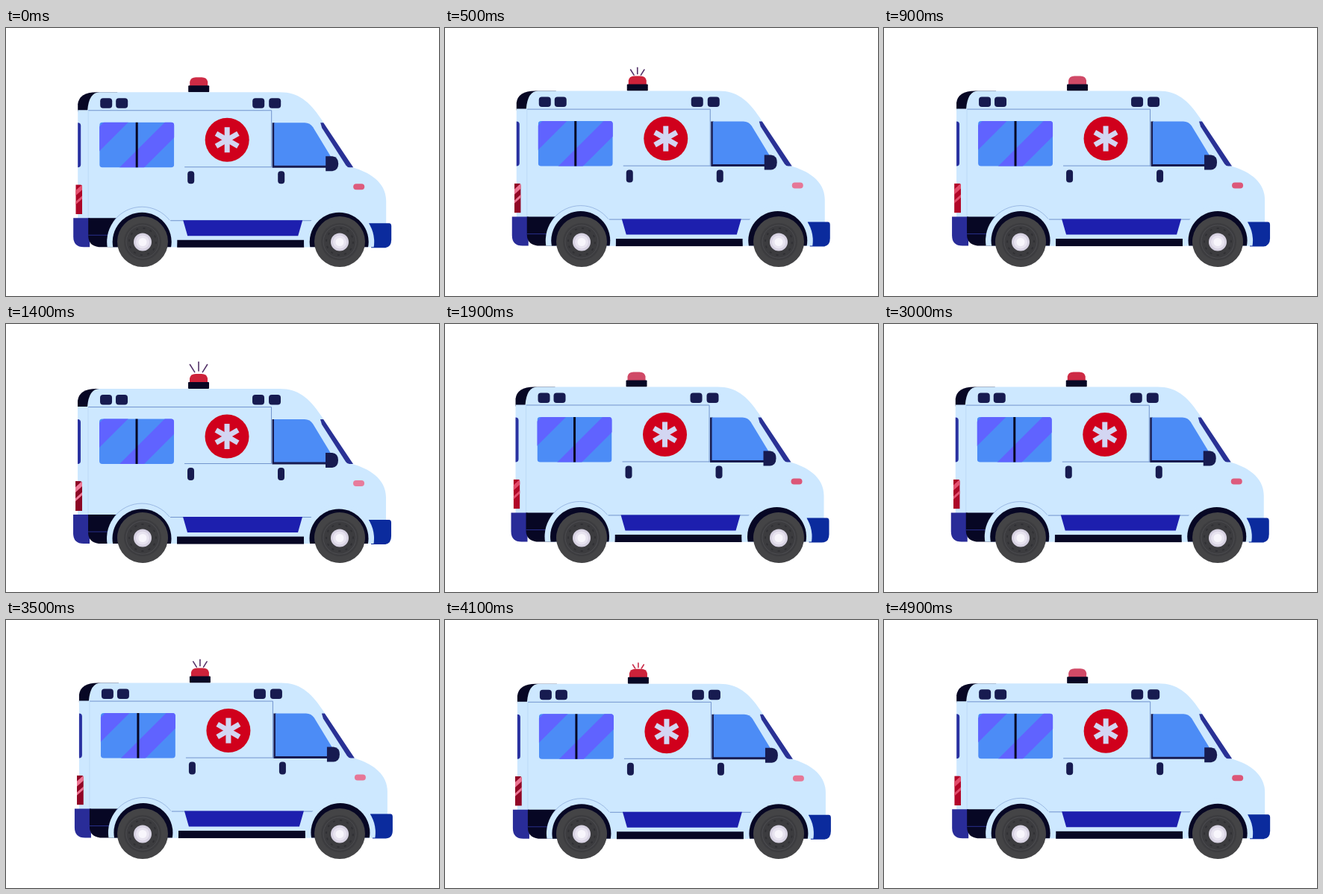
Animation of 580 by 360 pixels, one loop 5000 ms. Source, as an HTML page:

```html
<!DOCTYPE html>
<html lang="en">
<head>
<meta charset="utf-8">
<title>Ambulance</title>
<style>
  html, body { margin: 0; width: 100%; height: 100%; overflow: hidden; background: #fff; }
  svg { display: block; width: 580px; height: 360px; }
  .pale { fill: #cde8ff; }
  .ink { fill: #070724; }
  .navy { fill: #171b50; }
  .blue { fill: #1d1fae; }
  .glass { fill: #4c8cf6; }
  .seam { fill: none; stroke: #7193cd; stroke-width: 1; }
</style>
</head>
<body>
<svg viewBox="0 0 580 360">
  <defs>
    <clipPath id="pane"><rect x="126" y="126.500" width="100" height="60.500" rx="4"/></clipPath>
    <clipPath id="lamp"><path d="M94 210H100Q103 210 103 214V250H94Z"/></clipPath>
    <g id="wheel">
      <circle r="34" fill="#444446"/>
      <circle r="25" fill="#3c3c3f"/>
      <circle r="22" fill="none" stroke="#4c4c50"/>
      <circle r="18" fill="none" stroke="#303034" stroke-width="2" stroke-dasharray="3 6.425"/>
    </g>
    <g id="hub">
      <circle r="12" fill="#d7d2e2"/>
      <circle r="9" fill="#e8e4f0"/>
      <circle r="5.500" fill="#f8f6fc"/>
    </g>
  </defs>
  <rect width="580" height="360" fill="#fff"/>

  <g id="van">
    <g id="rays" stroke-width="1.600" stroke-linecap="round"></g>
    <path id="dome" d="M247 78V72Q248 66 255 66H263Q270 66 271 72V78Z"/>
    <rect class="ink" x="245" y="77" width="28" height="9" rx="1"/>

    <path class="ink" d="M97 112V102Q99 86 122 86H150V112Z"/>
    <path class="pale" d="M97 110H110Q112 86 126 86H368C392 86 407 98 423 122L465 187C486 193 510 206 510 232V263H489V294H140V256H97Z"/>
    <path class="seam" d="M111 110.500H356.500V187M240 186.500H357"/>
    <path d="M111 111V255" fill="none" stroke="#bcdaf7"/>
    <path d="M97 127Q101 127 101 131V183Q101 187 97 187Z" fill="#2931a0"/>
    <g id="fittings" class="navy"></g>

    <g clip-path="url(#pane)">
      <rect class="glass" x="126" y="126" width="100" height="62"/>
      <g id="shine" fill="#6063ff"></g>
      <rect class="ink" x="174.500" y="126" width="3" height="62"/>
    </g>

    <circle cx="297" cy="150" r="29.500" fill="#d0001c"/>
    <g id="star" stroke="#d3d6f2" stroke-width="7"></g>

    <path class="navy" d="M357.500 127H361V184H432V187.500H357.500Z"/>
    <path class="glass" d="M360 127H401Q408 127 412 133L438 176V184.500H360Z"/>
    <path d="M422 127H426L466 187H461Q458 187 456 184L424 134Z" fill="#293195"/>
    <path class="navy" d="M429 172H438Q446 173 446 182Q446 191 438 192H429Z"/>
    <rect id="head" x="466" y="209" width="15" height="8" rx="4"/>

    <g clip-path="url(#lamp)">
      <rect id="tail" x="94" y="210" width="9" height="40"/>
      <path id="glint" d="M92 220L104 209V216L92 227ZM92 235L104 224V228L92 239Z"/>
    </g>

    <path d="M91 255H113V294H105Q91 294 91 280Z" fill="#292c98"/>
    <path class="ink" d="M111 255H150V294H125Q111 292 111 279Z"/>
    <path d="M111 278H145" stroke="#29308c" fill="none"/>
    <path d="M487 262H514Q517 262 517 266V284Q517 295 507 295H490Z" fill="#0b2b9d"/>
    <path class="seam" d="M221 258.500H412"/>
    <path class="blue" d="M238 258H398L392 279H244Z"/>
    <rect class="ink" x="230" y="284.500" width="170" height="10"/>
    <g id="arches"></g>
    <path class="seam" d="M146 258A47 47 0 0 1 220 258" opacity=".55"/>
  </g>
  <g id="wheels"></g>
</svg>
<script>
const LOOP = 5000, STEP = 100, BLINK = 1000, SWAY = 1250;
const { sin, cos, PI, min, max } = Math;
const $ = id => document.getElementById(id);

function add(parent, name, attrs) {
  const el = document.createElementNS('http://www.w3.org/2000/svg', name);
  for (const k in attrs) el.setAttribute(k, attrs[k]);
  return parent.appendChild(el);
}

const clamp = v => min(1, max(0, v));
const mix = (a, b, k) => `rgb(${a.map((v, i) => Math.round(v + (b[i] - v) * k))})`;

for (const x of [127, 148, 331, 353])
  add($('fittings'), 'rect', { x, y: 94, width: 16, height: 13.5, rx: 4 });
for (const x of [244, 365])
  add($('fittings'), 'rect', { x, y: 192, width: 9, height: 17, rx: 4 });
for (const turn of [0, 60, 120])
  add($('star'), 'path', { d: 'M297 133V167', transform: `rotate(${turn} 297 150)` });
for (const x of [132, 214])
  add($('shine'), 'path', { d: `M${x} 126h33l-62 62h-33z` });

// Round opening that ends flat at the bottom of the body.
function arch(cx, r, cls) {
  const w = Math.sqrt(r * r - 49);
  add($('arches'), 'path', { class: cls, d: `M${cx - w} 294A${r} ${r} 0 1 1 ${cx + w} 294Z` });
}

const wheels = [183, 447].map(cx => {
  arch(cx, 47, 'pale');
  arch(cx, 39.5, 'ink');
  const g = add($('wheels'), 'g', { transform: `translate(${cx} 287)` });
  const tyre = add(g, 'use', { href: '#wheel' });
  add(g, 'use', { href: '#hub', y: .5 });
  return tyre;
});

const rays = [-32, 0, 32].map(turn =>
  add($('rays'), 'path', { transform: `rotate(${turn} 259 72)` }));

function draw(t) {
  // The body rocks on its springs: a slow swing plus a quicker shake.
  const a = 2 * PI * t / SWAY;
  const dx = -.7 + .8 * cos(a) - .3 * sin(a) - .9 * cos(2 * a) - .6 * sin(2 * a);
  const dy = -.65 + .9 * cos(a) + .8 * sin(a) + .5 * sin(2 * a);
  $('van').setAttribute('transform', `translate(${dx} ${dy})`);

  const p = t % BLINK / BLINK;
  const glow = clamp(.5 + 1.2 * cos(2 * PI * (p - .3)));
  const fade = max(0, cos(2 * PI * (p - .85))) ** 3;
  $('dome').setAttribute('fill', mix([205, 34, 58], [208, 80, 110], fade));
  $('head').setAttribute('fill', mix([220, 87, 120], [231, 124, 156], glow));
  $('tail').setAttribute('fill', mix([178, 6, 40], [140, 6, 36], glow));
  $('glint').setAttribute('fill', mix([226, 76, 106], [238, 123, 153], glow));

  const reach = 17 * max(0, sin(PI * p / .65));
  $('rays').setAttribute('stroke', p < .2 ? '#c9304d' : '#55346a');
  $('rays').setAttribute('visibility', reach > 0 ? 'visible' : 'hidden');
  for (const ray of rays) ray.setAttribute('d', `M259 ${66 - reach / 4}V${66 - reach}`);

  for (const w of wheels) w.setAttribute('transform', `rotate(${t / LOOP * 1800})`);
}

const start = performance.now();
function tick() {
  const t = (performance.now() - start) % LOOP;
  draw(Math.floor(t / STEP) * STEP);
  requestAnimationFrame(tick);
}
draw(0);
requestAnimationFrame(tick);
</script>
</body>
</html>
```
